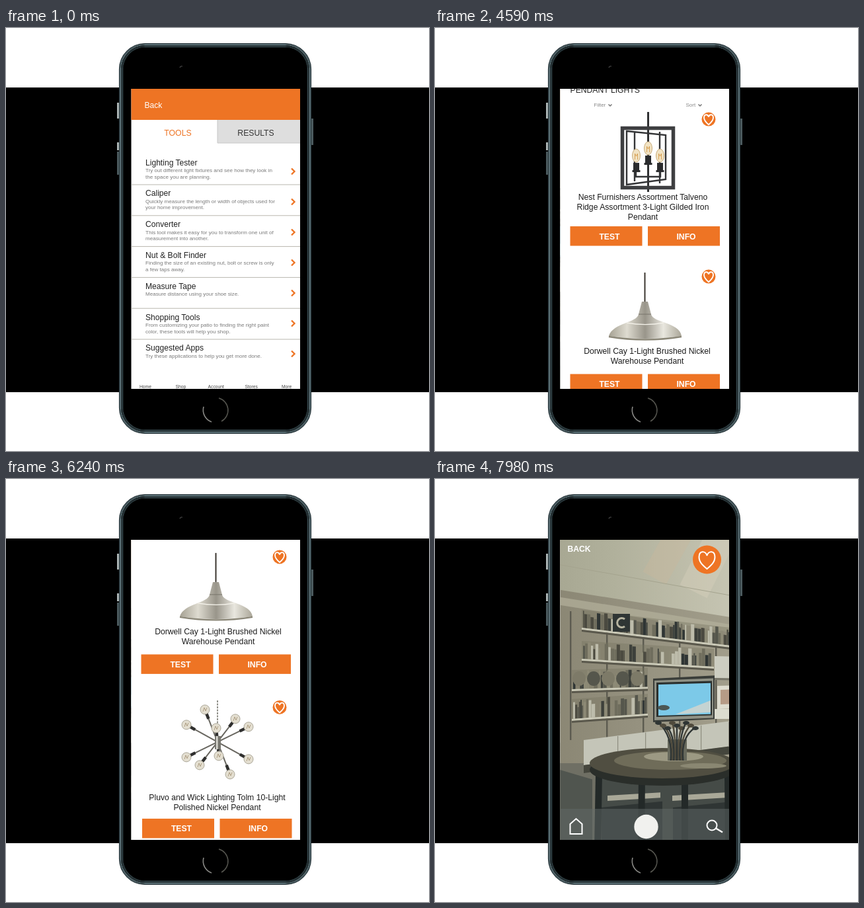
Recreate the animation shown at these times as an HTML page. Size 640 by 640 pixels, loop 8000 ms.

```html
<!DOCTYPE html>
<html lang="en">
<head>
<meta charset="utf-8">
<title>Lighting tester</title>
<style>
  html, body { margin: 0; width: 100%; height: 100%; overflow: hidden; background: #fff; }
  svg { display: block; width: 640px; height: 640px; font-family: "Liberation Sans", Arial, sans-serif; }
  .mid { text-anchor: middle; }
  .bold { font-weight: bold; }
</style>
</head>
<body>
<svg id="stage" viewBox="0 0 640 640"></svg>
<script>
const ORANGE = '#ee7424', DARK = '#2f3534';
const LEFT = 189, TOP = 92, WIDE = 257, HIGH = 454;

// Drawing helpers, each returns markup
const rect = (x, y, w, h, fill, more = '') =>
  `<rect x="${x}" y="${y}" width="${w}" height="${h}" fill="${fill}" ${more}/>`;
const line = (d, stroke, w = 1, more = '') =>
  `<path d="${d}" fill="none" stroke="${stroke}" stroke-width="${w}" ${more}/>`;
const oval = (x, y, rx, ry, fill, more = '') =>
  `<ellipse cx="${x}" cy="${y}" rx="${rx}" ry="${ry}" fill="${fill}" ${more}/>`;
// Upright panel whose top and bottom run at slope k
const slab = (x, y, w, h, k, fill, more = '') =>
  `<path d="M${x} ${y}l${w} ${k * w}v${h}l${-w} ${-k * w}z" fill="${fill}" ${more}/>`;
const text = (x, y, size, str, fill = '#222', cls = '') =>
  `<text x="${x}" y="${y}" font-size="${size}" fill="${fill}" class="${cls}">${str}</text>`;
const group = (id, body) => `<g id="${id}">${body}</g>`;
const each = (list, fn) => list.map(fn).join('');
const times = (n, fn) => Array.from({ length: n }, (_, i) => fn(i)).join('');
const sheet = fill => rect(LEFT, TOP, WIDE, HIGH, fill);
const ramp = (id, ...tones) => `<linearGradient id="${id}">` +
  each(tones, (c, i) => `<stop offset="${i / (tones.length - 1)}" stop-color="${c}"/>`) + '</linearGradient>';

let seed = 7;
const rand = () => (seed = seed * 16807 % 2147483647) / 2147483647;
const pick = list => list[rand() * list.length | 0];

const heart = (x, y, r) => oval(x, y, r, r, ORANGE) +
  `<path transform="translate(${x} ${y}) scale(${r > 15 ? 1 : .58})" fill="none" stroke="#fff" stroke-width="${r > 15 ? 2 : 3.2}"
    d="M0 14C-6 9-12 4-12-4C-12-14-2-14 0-6C2-14 12-14 12-4C12 4 6 9 0 14Z"/>`;
const house = (x, y) => line(`M${x - 9} ${y - 4}l9-8l9 8v15h-18z`, '#fff', 2);
const lens = (x, y) => oval(x, y, 7.5, 7.5, 'none', 'stroke="#fff" stroke-width="2"') +
  line(`M${x + 6} ${y + 4.5}l10 6`, '#fff', 2.4);

function phone() {
  // Nested outlines make the metal rim, from the edge inwards
  const rim = ['#26343a', '#4f6368', '#60757a', '#39494e', '#141c1e', '#40545a', '#0b1011'];
  return rect(0, 90, 640, 461, '#000') +
    rect(168, 113, 4, 24, '#aeb7b7') + rect(168, 173, 4, 12, '#aeb7b7') + rect(168, 187, 4, 35, '#4c5b5f') +
    rect(461, 137, 4, 40, '#4c5b5f') +
    each(rim, (c, i) => rect(171.5 + i, 23.5 + i, 290 - 2 * i, 590 - 2 * i, '#000', `rx="${39 - i}" stroke="${c}" stroke-width="1.2"`)) +
    line('M263 60q1-3 4-2', '#4a4a4a', 1.2) +
    line('M299 573A19 19 0 0 0 311 596', '#8a8a86', 1.6) +
    line('M322 560A19 19 0 0 1 326 595', '#55554f', 1.5);
}

function tools() {
  const rows = [
    ['Lighting Tester', 'Try out different light fixtures and see how they look in', 'the space you are planning.'],
    ['Caliper', 'Quickly measure the length or width of objects used for', 'your home improvement.'],
    ['Converter', 'This tool makes it easy for you to transform one unit of', 'measurement into another.'],
    ['Nut &amp; Bolt Finder', 'Finding the size of an existing nut, bolt or screw is only', 'a few taps away.'],
    ['Measure Tape', 'Measure distance using your shoe size.', ''],
    ['Shopping Tools', 'From customizing your patio to finding the right paint', 'color, these tools will help you shop.'],
    ['Suggested Apps', 'Try these applications to help you get more done.', '']
  ];
  return sheet('#fff') + rect(LEFT, TOP, WIDE, 47, ORANGE) +
    text(209.5, 121, 12.1, 'Back', '#fff') +
    rect(320, 139, 126, 35, '#dedede') + line('M320 139V174H446', '#c6c6c6') +
    text(260, 163, 12.3, 'TOOLS', ORANGE, 'mid') + text(378, 163, 12.2, 'RESULTS', '#333', 'mid') +
    each(rows, ([name, a, b], i) => {
      const y = 207.5 + 46.8 * i;
      return text(211, y, 12.1, name) + text(211, y + 10.4, 8.05, a, '#7b7b7b') +
        text(211, y + 20, 8.05, b, '#7b7b7b') +
        (i < 6 ? line(`M${LEFT} ${y + 29.5}h${WIDE}`, '#b9b7ae') : '') +
        line(`M432 ${212.5 + 46 * i}l4.5 4.5l-4.5 4.5`, ORANGE, 2.3);
    }) +
    each(['Home', 'Shop', 'Account', 'Stores', 'More'], (name, i) => text(211 + 53.4 * i, 545, 6.75, name, '#444', 'mid'));
}

// A sloping shelf packed with upright books
function shelf(x, y, w, k, high) {
  let out = slab(x, y - high, w, high, k, '#77735f', 'opacity=".4"');
  for (let dx = 2; dx < w - 4;) {
    const thick = 1.5 + rand() * 4, h = high * (.55 + rand() * .45);
    const tone = pick([DARK, '#3d403b', '#4b4a40', '#55564c', '#6f6d5d', '#8d8a76', '#bdbcab']);
    out += slab(x + dx, y - h + k * dx, thick, h, k, tone);
    dx += thick + (rand() < .12 ? 7 : .3);
  }
  return out + slab(x, y, w, 3, k, '#cbcab8') + slab(x, y + 3, w, 3, k, '#5a584c');
}

function television() {
  return slab(254, 302, 93, 66, -.05, '#3a3d39') + slab(256, 305, 89, 60, -.04, '#8f9185') +
    slab(259, 308, 84, 52, -.03, '#2b302e') + slab(262, 311, 79, 47, -.03, '#7cc9e8') +
    line('M341 335v18l-53 3z', 'none', 0, 'style="fill:#c5d3d2"') + oval(270, 346, 9, 4, '#4c5754');
}

function table() {
  return rect(168, 450, 202, 110, '#454b47') +
    times(2, i => slab(185 + 98 * i, 479, 80, 8, -.06, '#a9a898') + slab(176 + 108 * i, 497, 92, 70, -.1, DARK)) +
    times(4, i => line(`M${172 + 65 * i} 446l${i - 2} 114`, '#232928', 10)) +
    oval(268, 440, 110, 24, '#2a2e2a') + oval(268, 430, 110, 23, '#504e41') +
    oval(280, 426, 85, 14, '#6f6c59') + oval(285, 420, 45, 7, '#9c9983') + oval(330, 434, 35, 4, '#8a8772');
}

function vase() {
  return rect(276, 394, 29, 32, '#67695c') +
    times(9, i => {
      const lean = (i - 4) * 7, tone = i % 2 ? '#4f4a3c' : DARK;
      return line(`M${290 + lean / 3} 426Q${290 + lean / 5} 390 ${290 + lean} ${368 + i % 3 * 4}`, tone, 2.4) +
        oval(290 + lean, 369 + i % 3 * 4, 5, 3, tone);
    });
}

function room() {
  return rect(40, 80, 600, 480, 'url(#wall)') +
    // ceiling and far window wall
    slab(40, 167, 475, 12, .16, '#b4b19c', 'opacity=".7"') + slab(40, -100, 600, 256, .16, 'url(#ceil)') +
    line('M295 80L256 150', '#c8b79c', 40, 'opacity=".4"') + line('M360 80L315 170', '#d8d0bc', 46, 'opacity=".4"') +
    slab(40, 116, 500, 1, .18, '#a4a38e') +
    rect(515, 238, 125, 190, '#c4c5b6') + rect(545, 262, 60, 82, '#d9dbcf') +
    // floor
    rect(40, 430, 330, 130, '#6f6f64') + rect(370, 404, 270, 156, '#a2a18f') +
    slab(372, 425, 170, 24, .16, '#c0c0b1') + slab(370, 470, 130, 9, .2, '#77766a') +
    // shelving
    times(5, i => rect(128 + 55 * i, 200 + 8 * i, 2.4, 195, '#5c5b50')) +
    shelf(146, 225, 316, .12, 27) + shelf(146, 272, 200, .06, 27) +
    shelf(131, 318, 115, -.03, 29) + shelf(131, 363, 115, -.07, 30) +
    times(5, i => oval(142 + 22 * i, 302, 10, 11, i % 2 ? '#55564c' : '#7d7a68')) +
    rect(193, 204, 26, 27, DARK) + line('M211 212a7 7 0 1 0 0 11', '#b8b5a1', 3) +
    // cabinets
    slab(347, 268, 123, 33, .02, '#cccdc1') + slab(347, 301, 123, 3, .02, '#77766a') + rect(410, 270, 1.2, 32, '#8b8a7b') +
    slab(149, 395, 261, 38, -.13, '#c4c5b8') + slab(149, 433, 261, 12, -.13, '#45463d') +
    times(5, i => rect(200 + 42 * i, 389 - 5.4 * i, 1.2, 37, '#8e8d7f')) +
    television() +
    // picture and desk
    slab(351, 313, 29, 35, -.03, '#dedccf') + slab(356, 319, 19, 22, -.03, '#b69b86') + rect(347, 348, 36, 15, '#dcdccf') +
    slab(403, 321, 34, 31, -.05, '#c9cbc2') + slab(405, 323, 30, 23, -.05, '#232827') + rect(416, 350, 13, 9, '#b5b7ac') +
    slab(398, 361, 110, 4, -.06, '#d6d7ca') + slab(410, 366, 70, 5, -.04, '#5a594e') +
    // seats on the right
    line('M420 384q14-8 30-3M426 380l-10 40M444 380l8 38', DARK, 2) +
    oval(452, 436, 32, 22, DARK) + oval(450, 426, 24, 10, '#55584f') +
    oval(550, 366, 22, 25, DARK) + oval(532, 384, 16, 8, DARK) +
    slab(478, 432, 94, 10, -.03, '#55574f') + times(3, i => rect(480 + 43 * i, 440, 4, 52, DARK)) +
    slab(100, 436, 62, 124, .3, '#50554f') + table() + vase();
}

function browse() {
  const names = ['Ceiling Fans', 'Chandeliers', 'Commercial Lighting', 'Flushmount Lights', 'Lamps', 'Outdoor Lighting',
    'Pendant Lights', 'Picture Lights', 'Sonces', 'Track Lighting', 'Vanity Lighting'];
  const list = `<g opacity=".55">${sheet('#e3e3dd')}</g>` +
    each(names, (name, i) => text(319.5, 200 + 33.85 * i, 12.2, name, '#111', 'mid') +
      (i < 9 ? line(`M${LEFT} ${210 + 34.2 * i}h${WIDE}`, '#939a96') : '')) +
    text(319.5, 162, 11.9, 'BROWSE', '#fff', 'mid');
  return '<use id="view1" href="#room"/>' + group('list', list) +
    rect(LEFT, 511, WIDE, 35, '#5a6160', 'opacity=".86"') +
    text(201, 115, 12.1, 'BACK', ORANGE, 'bold') +
    text(201.5, 137.5, 19.1, 'LIGHTING TESTER', '#fff', 'bold') +
    house(212.5, 531) + lens(424, 529);
}

const buttons = (x, y) => each(['TEST', 'INFO'], (name, i) =>
  rect(x + 117.5 * i, y, 109, 29.5, ORANGE) + text(x + 59.5 + 116 * i, y + 19.6, 12.2, name, '#fff', 'mid bold'));
const caption = (x, y, ...lines) => each(lines, (s, i) => text(x, y + 15 * i, 12.2, s, '#1c1c1c', 'mid'));
const menu = (x, name, arrow) => text(x, 119, 8, name, '#888') + line(`M${arrow} 115.5l2.5 2.5l2.5-2.5`, '#777', 1.5);

function lantern() {
  return rect(321, 127, 3, 121, '#2f3032') +
    rect(283.5, 151.5, 77, 90, 'none', 'stroke="#3e3f41" stroke-width="5.5"') +
    line('M290 156L349 162V229L290 237ZM302 158V232M340 157V235M304 217V225H341V217', '#333436', 2.4) +
    times(3, i => {
      const x = 304.5 + 18 * i, y = i === 1 ? 183 : 194;
      return oval(x, y - 1, 6, 10, '#f1e3c4', 'stroke="#c9ad7c"') +
        line(`M${x - 2} ${y + 5}v-9l2 4l2-4v9`, '#d59a4a', .9) +
        rect(x - 4.5, y + 10, 9, 12, '#2b2c2e') + rect(x - 6, y + 21, 12, 3, '#2b2c2e');
    });
}

function barnLamp() {
  return rect(316.5, 370, 2, 44, '#3a352f') + line('M317.5 413V433', 'url(#nickel)', 0) +
    '<path d="M313 414h9l5 19c2 13 43 12 46 33q-55 8-110 0c6-20 43-20 45-33z" fill="url(#nickel)"/>' +
    line('M263 467q55 9 110 0', '#8b8778', 2.4) + line('M308 433h19', '#77736a') + line('M290 446q28 5 56 0', '#f4f2ea', 1.2);
}

// Five rods through the hub, a bulb on both ends of each
function starLamp() {
  const cx = 320, cy = 656, rods = [[19, 49], [-27, 35], [-47, 23], [47, 26], [2, 21]];
  const bulb = (dx, dy) => {
    const n = Math.hypot(dx, dy), ux = dx / n, uy = dy / n, x = cx + dx, y = cy + dy;
    return line(`M${cx} ${cy}L${x} ${y}`, '#68665f', 2) +
      line(`M${x} ${y}l${-ux * 15} ${-uy * 15}`, '#2f2f2e', 4.5) +
      oval(x, y, 7, 7, '#e4dfd1', 'stroke="#aaa697"') + line(`M${x - 3} ${y + 3}l2-6l2 5l2-5`, '#a8977a', .9);
  };
  return line(`M${cx} 593V640`, '#77776f', 1.6, 'stroke-dasharray="3 1.5"') +
    each(rods, ([dx, dy]) => bulb(dx, dy) + bulb(-dx, -dy)) +
    rect(cx - 4, 647, 9, 20, '#77766f') + rect(cx - 2, 647, 2.5, 20, '#dad9d2');
}

function shop() {
  const page = text(201, 77.5, 12.1, 'BACK', ORANGE, 'bold') +
    text(204.5, 97.5, 12.2, 'PENDANT LIGHTS') + menu(240.5, 'Filter', 262.5) + menu(379.5, 'Sort', 398.5) +
    heart(414, 138, 10.5) + lantern() +
    caption(314.5, 260, 'Nest Furnishers Assortment Talveno', 'Ridge Assortment 3-Light Gilded Iron', 'Pendant') +
    buttons(204.5, 300) +
    heart(414, 376, 10.5) + barnLamp() +
    caption(321, 493, 'Dorwell Cay 1-Light Brushed Nickel', 'Warehouse Pendant') +
    buttons(204.5, 523.5) +
    heart(414, 603.5, 10.5) + starLamp() +
    caption(319.5, 744.5, 'Pluvo and Wick Lighting Tolm 10-Light', 'Polished Nickel Pendant') +
    buttons(206, 772);
  return sheet('#fff') + group('page', page);
}

const camera = () => '<use id="view2" href="#room"/>' +
  rect(LEFT, 499, WIDE, 47, '#626a68', 'opacity=".5"') +
  text(200.5, 109.7, 12.1, 'BACK', '#fff', 'bold') + heart(411.5, 122, 21.5) +
  house(213.5, 526) + oval(319.5, 526, 18.2, 18.2, '#f1f1ee') + lens(419, 524);

const el = id => document.getElementById(id);
el('stage').innerHTML = `<defs><clipPath id="glass">${rect(189.5, TOP, 255.5, HIGH, '#fff')}</clipPath>` +
  ramp('ceil', '#a0a08b', '#b0b09b', '#c2c1ae', '#d0d0c4', '#d2d3c5') +
  ramp('wall', '#85816e', '#969280', '#a8a491', '#b4b19f') +
  ramp('nickel', '#a5a193', '#dedbd0', '#99958a', '#e9e7df', '#aaa698') +
  group('room', room()) + '</defs>' + phone() +
  `<g clip-path="url(#glass)">${group('tools', tools())}${group('browse', browse())}${group('shop', shop())}${group('camera', camera())}</g>`;

const LOOP = 8000, TICK = 30;
// Linear move from a to b between two times, held outside them
const move = (t, t0, t1, a, b) => a + (b - a) * Math.min(1, Math.max(0, (t - t0) / (t1 - t0)));
const fade = (id, t, t0, span) => el(id).setAttribute('opacity', move(t, t0, t0 + span, 0, 1));
const shift = (id, x, y) => el(id).setAttribute('transform', `translate(${x} ${y})`);

function draw(now) {
  const t = Math.floor(now % LOOP / TICK) * TICK;
  fade('browse', t, 0, 240);
  fade('list', t, 2580, 120);
  fade('shop', t, 3420, 180);
  fade('camera', t, 6750, 180);
  shift('view1', move(t, 0, 2220, -100, -138) + move(t, 2610, 3360, 0, -12.5), -9);
  shift('page', 0, move(t, 4350, 6240, 37.6, -258.1));
  shift('view2', move(t, 6780, 7980, -103, 76), 0);
}

const start = performance.now();
function frame() {
  draw(performance.now() - start);
  requestAnimationFrame(frame);
}
frame();
</script>
</body>
</html>
```
